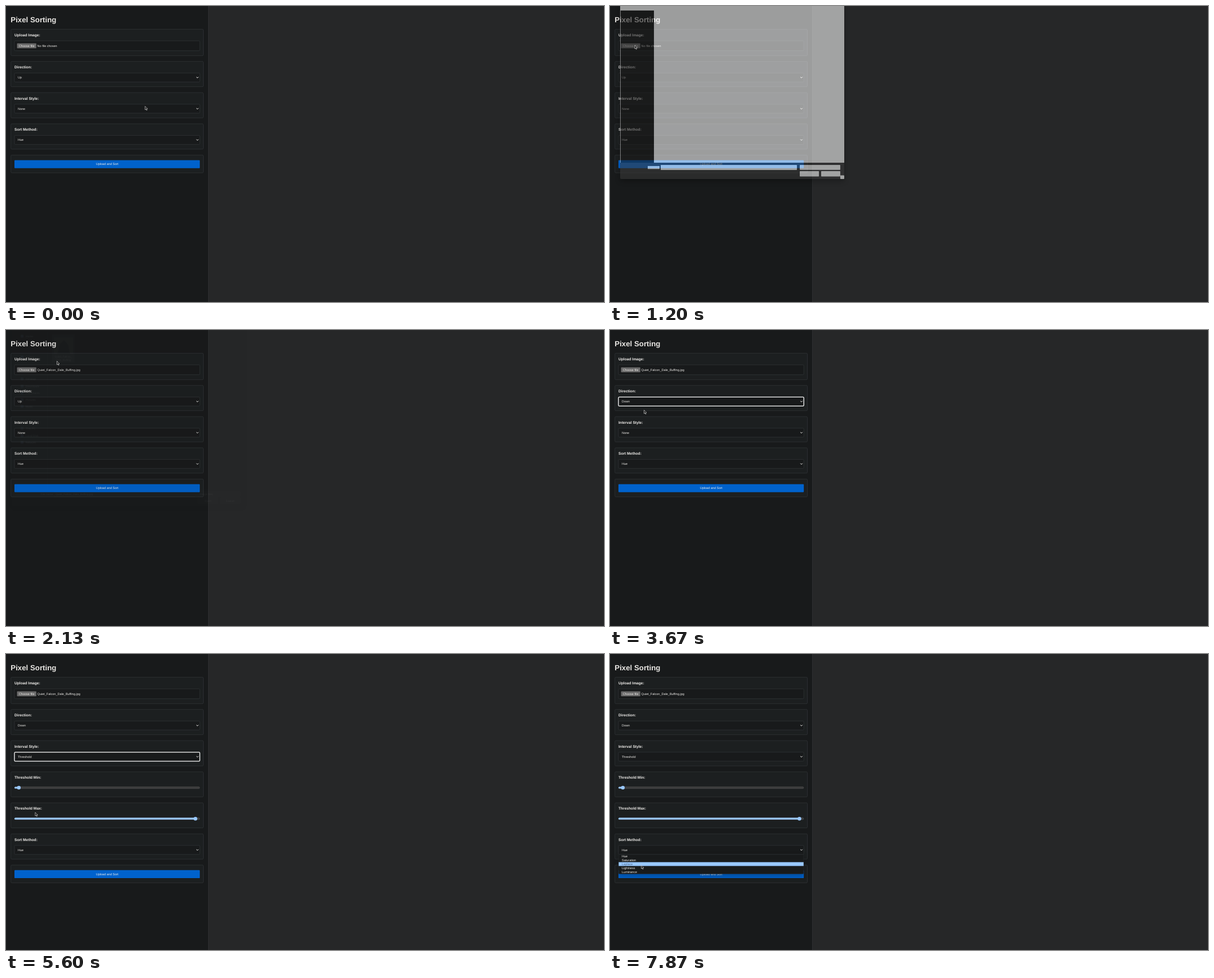
An HTML page that plays this animation: 1062 by 527 pixels, repeating every 8 s.

```html
<!DOCTYPE html>
<html lang="en">
<head>
<meta charset="utf-8">
<title>Pixel Sorting</title>
<style>
  html, body { margin: 0; width: 100%; height: 100%; overflow: hidden; background: #262728; }
  svg { display: block; width: 100%; height: 100%; }
  text { font-family: "Liberation Sans", Arial, sans-serif; text-rendering: geometricPrecision; white-space: pre; }
  .popup { filter: drop-shadow(0 4px 4px rgba(0, 0, 0, .25)); }
  .dialog { filter: drop-shadow(0 4px 5px rgba(0, 0, 0, .5)); }
</style>
</head>
<body>
<svg id="stage" viewBox="0 0 1062 527" preserveAspectRatio="none"></svg>
<script>
const stage = document.getElementById('stage');
const LOOP = 8000, TICK = 200 / 3;
const FG = '#f0eeeb', BG = '#181a1b', LINE = '#303436', BLUE = '#99c8ff';
const X = 15, W = 329.2, ROW = 6.8;
const FILE = 'Quiet_Falcon_Dale_Buffing.jpg';

// Pointer stops: time, x, y
const path = [
  [0, 247, 178.5], [733, 44, 70], [1333, 44, 70], [1800, 92, 48], [2067, 92, 48],
  [2133, 90.5, 55.5], [2800, 60, 126], [2867, 60, 126], [3267, 60.5, 142.6],
  [3667, 60.5, 142.6], [4000, 54, 214], [4267, 50, 187.5], [4800, 50, 187.5],
  [5000, 50.5, 200], [5133, 50.5, 200], [6000, 53, 347], [6200, 53, 347],
  [6467, 54.5, 361], [7000, 55.5, 383.7], [7133, 55.5, 383.7], [7267, 55, 383.2],
  [7400, 55, 383.2], [7867, 55.5, 376]
];

const clamp = v => Math.max(0, Math.min(1, v));
const between = (t, a, b) => t >= a - 1 && t < b - 1;

const rect = (x, y, w, h, fill, rx = 0, stroke = 'none', sw = .8) =>
  `<rect x="${x}" y="${y}" width="${w}" height="${h}" rx="${rx}" fill="${fill}" stroke="${stroke}" stroke-width="${sw}"/>`;
const text = (x, y, s, size = 5.53, fill = FG, extra = '') =>
  `<text x="${x}" y="${y}" font-size="${size}" fill="${fill}" ${extra}>${s}</text>`;

function pointerAt(t) {
  const i = path.findIndex(p => p[0] > t);
  if (i < 0) return path[path.length - 1].slice(1);
  const [t0, x0, y0] = path[i - 1], [t1, x1, y1] = path[i];
  const u = clamp((t - t0) / (t1 - t0)), e = u * u * (3 - 2 * u);
  return [x0 + (x1 - x0) * e, y0 + (y1 - y0) * e];
}

function card(y, h, label = '') {
  return rect(8.7, y, 341.8, h, '#1c1f20', 1.6, LINE) +
    text(X, y + 12.4, label, 6.64, FG, 'font-weight="bold"');
}

function select(y, label, value, focused) {
  const ring = focused ? ['#fff', 1.3] : [LINE, .8];
  return card(y, 45, label) +
    rect(X, y + 20.6, W, 16, BG, 1.6, ...ring) +
    text(21, y + 30.4, value) +
    `<path d="M338.1 ${y + 27.6}l1.9 1.9 1.9-1.9" fill="none" stroke="${FG}" stroke-width="1"/>`;
}

function slider(y, label, at) {
  const cy = y + 28.2;
  return card(y, 44.6, label) +
    rect(X + .3, cy - 1.6, W - .6, 3.2, '#3b3b3b', 1.6, '#5c5c5c', .5) +
    rect(X, cy - 1.6, at - X, 3.2, BLUE, 1.6) +
    `<circle cx="${at}" cy="${cy}" r="3.3" fill="${BLUE}"/>`;
}

function popup(cardY, items, py) {
  const top = cardY + 36.8;
  const hot = Math.max(0, Math.min(items.length - 1, Math.floor((py - top) / ROW)));
  return `<g class="popup">` +
    rect(15.4, top, 328.4, items.length * ROW + .6, BG, 1.6, '#2b2e30', .5) +
    rect(15.4, top + hot * ROW, 328.4, ROW, BLUE, hot ? 0 : 1.6) +
    items.map((s, i) => text(21, top + 5.3 + i * ROW, s, 5.53, i === hot ? '#4d6680' : FG)).join('') +
    '</g>';
}

function submit(y) {
  return card(y, 31.6) + rect(X, y + 9, W, 14.3, '#0062cc', 1.2) +
    text(179.7, y + 18, 'Upload and Sort', 5.53, FG, 'text-anchor="middle"');
}

function upload(t, px, py) {
  const over = px > 19 && px < 54 && py > 66 && py < 75;
  const fill = between(t, 867, 933) ? '#616161' : over ? '#7b7b7b' : '#6b6b6b';
  return card(41.4, 47, 'Upload Image:') +
    rect(X, 62, W, 17.6, BG, 1.6, LINE) +
    rect(19.6, 66.6, 34.2, 8.6, fill, .8) +
    text(22.9, 72.8, 'Choose file') +
    text(55.6, 72.8, t < 2066 ? 'No file chosen' : FILE);
}

// Footer controls shared by both states of the file dialog
const fields = (fill, stroke) => rect(85.7, 287.5, 250.2, 9.3, fill, .8, stroke, .5) +
  rect(341.1, 287.5, 74.4, 9, fill, .8, stroke, .5) +
  rect(341.1, 298.9, 35.2, 9.8, fill, .8, stroke, .5) +
  rect(380.4, 298.9, 35.1, 9.8, fill, .8, stroke, .5);

function blankDialog() {
  return rect(11.2, -100, 411.6, 413.4, '#383838', 2) +
    rect(11.2, -100, 411.6, 383.4, '#fff') +
    rect(12, 3.2, 61.3, 280.2, '#191919') +
    rect(61.9, 289.5, 21.7, 5.5, '#fff') + fields('#fff', 'none') +
    rect(415.5, 306.8, 7.3, 6.6, '#fff', 1);
}

function filledDialog() {
  const places = [['Home', 11], ['Gallery', 48], ['Desktop', 87], ['Downloads', 100], ['Documents', 112],
    ['Pictures', 124], ['Music', 136], ['This PC', 175], ['Local Disk', 188], ['Network', 200]];
  const dim = '#d0d0d0';
  return rect(11.2, -100, 411.6, 413.4, '#202020', 2) +
    rect(11.2, -100, 411.6, 383.4, '#191919') +
    rect(73.3, 3, .5, 280, '#2b2b2b') +
    places.map(([s, y]) => rect(26, y - 2.5, 5, 5, '#5a7890', .8) + text(35, y + 1.8, s, 4.9, dim)).join('') +
    rect(82, 8, 40, 50, '#333', 1) +
    rect(85, 13, 34, 30, '#504a45') +
    '<path d="M91 43l5-18 7-7 7 8 4 17z" fill="#211f1e"/>' +
    text(102, 49, 'Quiet_Falcon_', 4.7, dim, 'text-anchor="middle"') +
    text(102, 54.7, 'Dale_Buffing', 4.7, dim, 'text-anchor="middle"') +
    text(62, 293.8, 'File name:', 4.8, dim) + fields('#2b2b2b', '#555') +
    text(88, 293.8, FILE, 4.8, dim) +
    text(344, 293.8, 'Image files', 4.8, dim) +
    text(358.7, 305.5, 'Open', 4.8, dim, 'text-anchor="middle"') +
    text(398, 305.5, 'Cancel', 4.8, dim, 'text-anchor="middle"');
}

function dialog(t) {
  if (!between(t, 1133, 2200)) return '';
  const p = clamp((t - 1066.7) / 266.7);
  const alpha = t < 1950 ? p ** .8 : clamp(1 - (t - 1933) / 213);
  const s = .934 + .066 * p;
  return `<g opacity="${alpha}"><g class="dialog" transform="translate(217 150) scale(${s}) translate(-217 -150)">` +
    (t < 1260 ? blankDialog() : filledDialog()) + '</g></g>';
}

const pointer = (x, y) =>
  `<path transform="translate(${x} ${y})" d="M0 0V6.2L1.5 4.9 2.5 7.2 3.5 6.8 2.5 4.5H4.4Z" fill="#0c0c0c" stroke="#e4e4e4" stroke-width=".65" stroke-linejoin="round"/>`;

function draw(t) {
  const [px, py] = pointerAt(t);
  const wide = t >= 5199;
  const dirY = 98.7, styleY = 154.2, thirdY = 209.8;
  const sortY = wide ? 320.2 : thirdY;
  let s = rect(0, 0, 1062, 527, '#262728') + rect(0, 0, 359.5, 527, BG) +
    rect(359, 0, .6, 527, '#383b3d') +
    text(8.3, 29.2, 'Pixel Sorting', 13.27, '#e8e6e3', 'font-weight="bold"') +
    upload(t, px, py) +
    select(dirY, 'Direction:', t < 3666 ? 'Up' : 'Down', between(t, 3667, 4000)) +
    select(styleY, 'Interval Style:', wide ? 'Threshold' : 'None', between(t, 5200, 6067));
  if (wide) s += slider(thirdY, 'Threshold Min:', 22.8) + slider(265, 'Threshold Max:', 336.4);
  s += select(sortY, 'Sort Method:', 'Hue', false) + submit(sortY + 55.6);
  if (between(t, 2933, 3667)) s += popup(dirY, ['Up', 'Down', 'Left', 'Right'], py);
  if (between(t, 4800, 5200)) s += popup(styleY, ['None', 'Threshold'], py);
  if (t >= 6132) s += popup(sortY, ['Hue', 'Saturation', 'Laplace', 'Lightness', 'Luminance'], py);
  stage.innerHTML = s + dialog(t) + pointer(px, py);
}

const start = performance.now();
let last = -1;
function loop() {
  const t = (performance.now() - start) % LOOP;
  const tick = Math.min(119, Math.floor((t + 4) / TICK));
  if (tick !== last) draw(tick * TICK);
  last = tick;
  requestAnimationFrame(loop);
}
loop();
</script>
</body>
</html>
```
